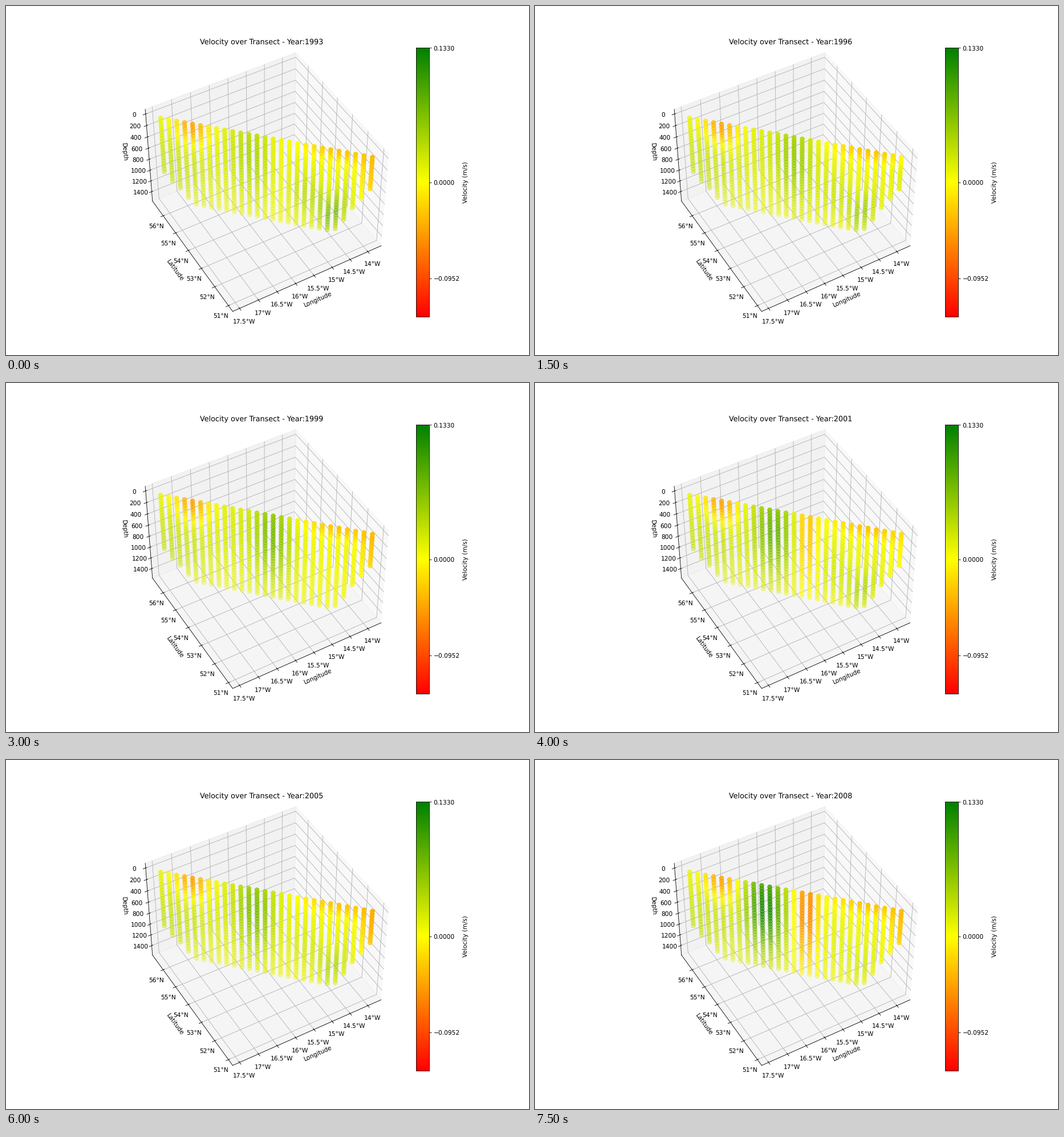
A matplotlib script for the animation above (8000 ms loop, 917 px wide and 611 px high).

```python
import numpy as np
import matplotlib.pyplot as plt
from matplotlib.animation import FuncAnimation
from matplotlib.colors import LinearSegmentedColormap, Normalize

W, H, DPI = 917, 611, 76.4
VMAX = 0.133
FIRST_YEAR, N_YEARS = 1993, 16
N_COLS, STEP, MAX_SAMPLES = 27, 50, 30

plt.rcParams["text.hinting"] = "none"

# Sea floor: a gentle slope on the left, a flat basin, a steep slope on the right
stations = np.arange(N_COLS)
left_slope = 20 + 2.6 * stations
right_slope = 12 + 4.25 * (N_COLS - 1 - stations)
counts = np.minimum(np.minimum(left_slope, right_slope), MAX_SAMPLES)
counts = np.round(counts).astype(int)

col = np.repeat(stations, counts)
depth = np.concatenate([STEP / 2 + STEP * np.arange(n) for n in counts])
along = col / (N_COLS - 1)
lon = -17.423 + along * 3.541
lat = 56.486 - along * 5.397

# Key years of the wandering eddy, the deep slope current and the eastern edge
KEY_YEARS = [1993, 1995, 1997, 1999, 2001, 2005, 2008]
EDDY_COL = [11.5, 15.8, 10.6, 14, 10.4, 11.8, 9.4]
EDDY_SPEED = [0.024, 0.04, 0.035, 0.055, 0.06, 0.05, 0.105]
DEEP_SPEED = [0.065, 0.03, 0.06, 0, 0.035, 0.035, 0.015]
EDGE_SPEED = [-0.035, -0.015, 0.03, -0.035, -0.01, -0.045, -0.035]


def blob(c, c_spread, d, d_spread):
    return np.exp(-((col - c) / c_spread) ** 2 / 2
                  - ((depth - d) / d_spread) ** 2 / 2)


def velocity(year):
    eddy, speed, deep, edge = (
        np.interp(year, KEY_YEARS, key)
        for key in (EDDY_COL, EDDY_SPEED, DEEP_SPEED, EDGE_SPEED))
    # The further west the eddy sits, the stronger the return flow
    back = np.clip(0.035 * (11.7 - eddy), 0, 0.08)

    v = 0.007 + 0.024 * blob(1, 4, 850, 500)
    v += 0.012 * blob(11, 3, 350, 500)
    v -= 0.060 * blob(3.9, 1.5, 50, 230)
    v -= 0.038 * blob(22, 3, 0, 130)
    v += speed * blob(eddy, 1.6, 400, 550)
    v -= back * blob(14.5, 1, 350, 600)
    v += deep * blob(21.5, 1.2, 1200 - 120 * abs(col - 21), 250)
    v += 0.4 * deep * blob(18, 1.4, 900, 300)
    v += edge * blob(26, 0.9, 300, 350)
    return np.clip(v, -VMAX, VMAX)


def title(year):
    return f"Velocity over Transect - Year:{year}"


# The tiny surplus keeps the pixel size from being rounded down
fig = plt.figure(figsize=((W + 1e-6) / DPI, (H + 1e-6) / DPI), dpi=DPI)
ax = fig.add_subplot(111, projection="3d")
ax.view_init(elev=45, azim=-120)

cmap = LinearSegmentedColormap.from_list("flow", ["red", "yellow", "green"])
points = ax.scatter(lon, lat, -depth, c=velocity(FIRST_YEAR), s=50,
                    cmap=cmap, norm=Normalize(-VMAX, VMAX))

ax.set_xlim(-17.681, -13.623)
ax.set_ylim(50.696, 56.880)
ax.set_zlim(-1580.7, 80.7)

lons = np.arange(-17.5, -13.9, 0.5)
lats = np.arange(51, 57)
depths = np.arange(0, 1401, 200)
ax.set_xticks(lons, [f"{-x:g}°W" for x in lons])
ax.set_yticks(lats, [f"{y}°N" for y in lats])
ax.set_zticks(-depths, [str(d) for d in depths])
ax.set_xlabel("Longitude")
ax.set_ylabel("Latitude")
ax.set_zlabel("Depth")
heading = ax.set_title(title(FIRST_YEAR))

bar = fig.colorbar(points, ax=ax, label="Velocity (m/s)")
bar.set_ticks([-0.0952, 0, VMAX], labels=["\u22120.0952", "0.0000", "0.1330"])
bar.ax.minorticks_off()


def update(i):
    year = FIRST_YEAR + i
    points.set_array(velocity(year))
    heading.set_text(title(year))
    return points, heading


anim = FuncAnimation(fig, update, frames=N_YEARS, interval=500,
                     repeat=True, repeat_delay=0, blit=False)
plt.show()
```
